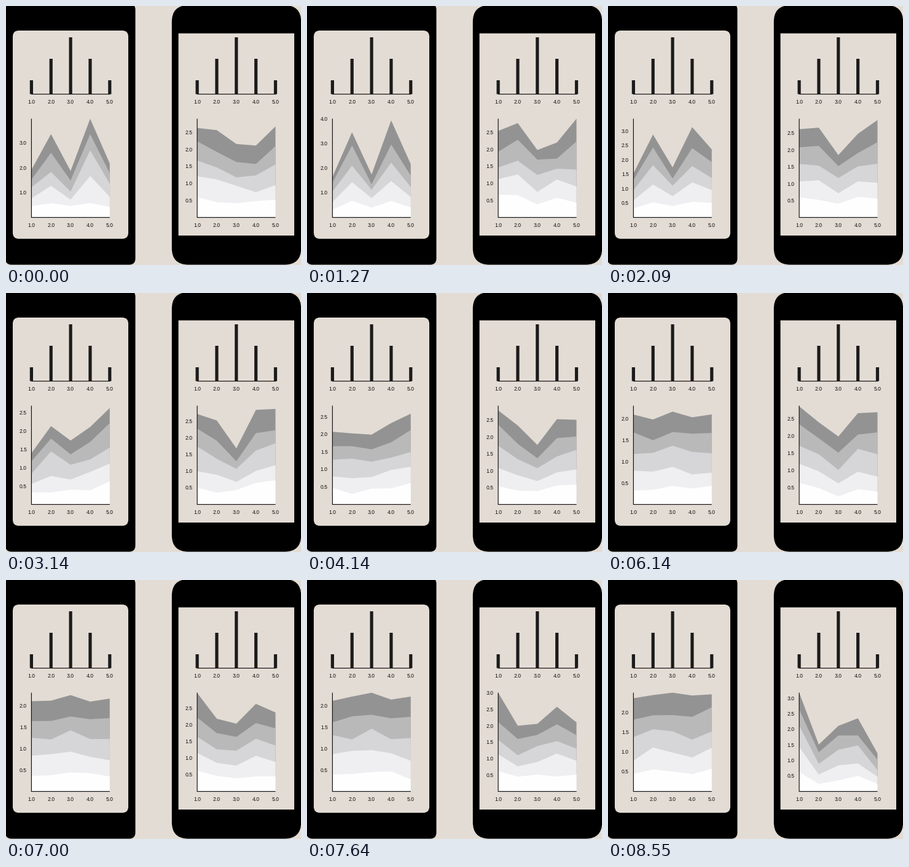
Write a matplotlib script that moves like this. It is 480 by 422 pixels and loops after 8600 ms.

```python
import numpy as np
import matplotlib.pyplot as plt
from matplotlib.animation import FuncAnimation
from matplotlib.patches import FancyBboxPatch, Polygon, Rectangle

W, H, DPI = 480, 422, 100
FRAMES, STEP = 200, 43
PAPER, INK = "#e3dcd4", "#111111"
GREYS = ["#949394", "#bab9ba", "#d6d5d7", "#efeef1", "#fefefe"]
TOP, BASE = 183.6, 344.5
COLS = np.linspace(41.4, 168.8, 5)
DX = 269.7
TIMES = [0, 1270, 3140, 5410, 6140, 7640, 8550]

fig = plt.figure(figsize=(W / DPI, H / DPI), dpi=DPI, facecolor=PAPER)
ax = fig.add_axes([0, 0, 1, 1])
ax.set(xlim=(0, W), ylim=(H, 0))
ax.axis("off")


def box(x0, y0, x1, y1, color, r=0):
    if r:
        patch = FancyBboxPatch((x0, y0), x1 - x0, y1 - y0, fc=color, lw=0,
                               boxstyle=f"round,pad=0,rounding_size={r}")
    else:
        patch = Rectangle((x0, y0), x1 - x0, y1 - y0, fc=color, lw=0, snap=False)
    ax.add_patch(patch)


def line(xs, ys):
    ax.plot(xs, ys, color=INK, lw=0.85, solid_capstyle="butt", snap=False, zorder=5)


def label(x, y, text, ha):
    return ax.text(x, y + 3.1, text, ha=ha, va="baseline", color=INK,
                   family="Liberation Sans", size=8.7 * 72 / DPI, zorder=6)


def lerp(a, b, u):
    return a + (b - a) * u


def bar_chart(dx):
    for k, x in enumerate(COLS + dx):
        y = 51 + 35 * abs(k - 2)
        box(x - 2.6, y, x + 2.6, 143.5, "#1c1b1b")
        label(x, 156.2, f"{k + 1}.0", "center")
    line([COLS[0] + dx - 0.5, COLS[-1] + dx + 1], [143.6, 143.6])


class AreaChart:
    """Five stacked areas under an outline that tweens from pose to pose."""

    def __init__(self, dx, seed):
        self.x = COLS + dx
        self.rng = np.random.default_rng(seed)
        self.tops, self.poses = [], []
        self.areas = [ax.add_patch(Polygon([(0, 0)] * 3, fc=c, lw=0, zorder=3 + i / 10))
                      for i, c in enumerate(GREYS)]
        self.labels = [label(33.8 + dx, 0, "", "right") for _ in range(8)]
        for k, x in enumerate(self.x):
            label(x, 356.8, f"{k + 1}.0", "center")
        line([self.x[0]] * 2, [TOP, BASE + 0.5])
        line([self.x[0], self.x[-1]], [BASE, BASE])

    def pose(self, outline, top=None):
        """Split an outline into layers of random thickness."""
        parts = self.rng.uniform(0.45, 1, (len(GREYS), len(outline)))
        shares = np.cumsum(parts, axis=0)[::-1] / parts.sum(axis=0)
        self.poses.append(shares * outline)
        self.tops.append(top or max(outline))

    def draw(self, t):
        k = min(np.searchsorted(TIMES, t, side="right"), len(TIMES) - 1)
        u = min((t - TIMES[k - 1]) / (TIMES[k] - TIMES[k - 1]), 1)
        top = lerp(self.tops[k - 1], self.tops[k], u)
        rows = lerp(self.poses[k - 1], self.poses[k], u)
        unit = (BASE - TOP) / top
        for area, row in zip(self.areas, rows):
            area.set_xy([(self.x[0], BASE), *zip(self.x, BASE - row * unit),
                         (self.x[-1], BASE)])
        step = 1.0 if top > 3.5 else 0.5
        for n, text in enumerate(self.labels, 1):
            v = n * step
            text.set_text(f"{v:.1f}" if v <= top + 0.001 else "")
            text.set_y(BASE - v * unit + 3.1)


box(-1, -4, 210.5, 421.5, "black", 10)
box(11, 40, 199, 379.3, PAPER, 10)
box(269.8, -1.2, 480.2, 421.5, "black", 27)
box(280.6, 44.6, 469, 374, PAPER)
bar_chart(0)
bar_chart(DX)

left = AreaChart(0, seed=4)
left.pose([1.92, 3.35, 1.87, 3.97, 2.17])
left.pose([1.64, 3.45, 1.74, 3.93, 2.16], top=4)
left.pose([1.38, 2.13, 1.73, 2.1, 2.62], top=2.68)
left.pose([2.94, 1.9, 2.32, 2.6, 2.55], top=2.99)
left.pose([2.09, 1.99, 2.17, 2.03, 2.1], top=2.3)
left.pose([2.11, 2.21, 2.3, 2.14, 2.21])
left.pose([2.36, 2.44, 2.5, 2.43, 2.46])

right = AreaChart(DX, seed=9)
right.pose([2.63, 2.56, 2.16, 2.11, 2.67], top=2.9)
right.pose([2.54, 2.77, 1.98, 2.2, 2.9])
right.pose([2.71, 2.52, 1.68, 2.84, 2.87], top=2.96)
right.pose([2.89, 2.12, 1.87, 2.14, 2.06])
right.pose([2.87, 2.41, 1.99, 2.68, 2.71], top=2.89)
right.pose([3.01, 2, 2.06, 2.58, 2.1])
right.pose([3.18, 1.5, 2.11, 2.35, 1.21])


def update(i):
    t = (i + 0.5) * STEP
    left.draw(t)
    right.draw(t)
    return []


anim = FuncAnimation(fig, update, frames=FRAMES, interval=STEP,
                     init_func=lambda: update(0), repeat=True, repeat_delay=0)
plt.show()
```
